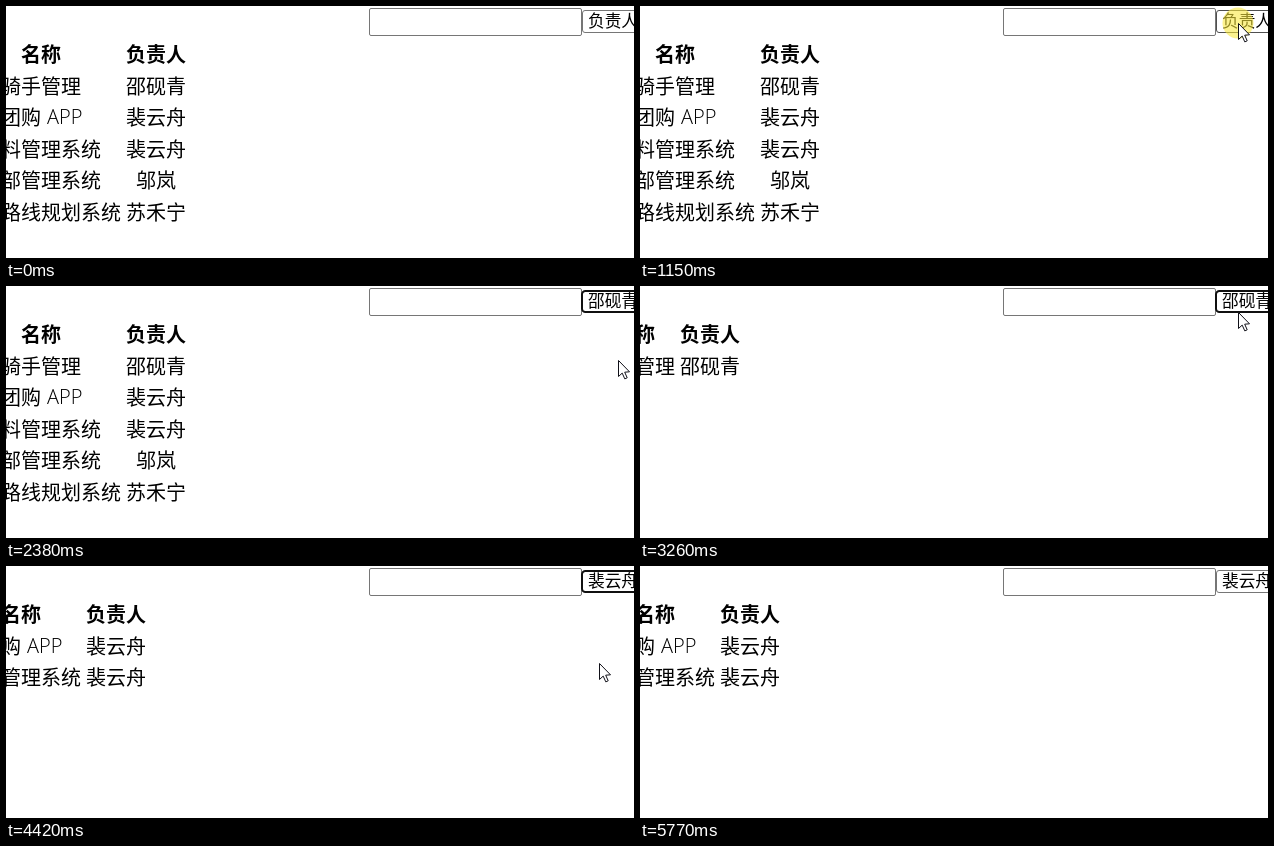
An HTML page with a canvas that plays this animation: 628 px wide and 252 px high, repeating every 5840 ms.

```html
<!DOCTYPE html>
<html lang="zh-CN">
<head>
<meta charset="utf-8">
<title>按负责人筛选</title>
<style>
html, body { margin: 0; width: 100%; height: 100%; overflow: hidden; background: #fff; }
canvas { display: block; width: 628px; height: 252px; }
</style>
</head>
<body>
<canvas id="stage" width="628" height="252"></canvas>
<script>
const ctx = document.getElementById('stage').getContext('2d');
const LOOP = 5840;
const CJK = '"Noto Sans CJK SC", "Noto Sans CJK", sans-serif';

const options = ['负责人', '邵砚青', '裴云舟', '邬岚', '苏禾宁'];
const projects = [
  ['骑手管理', 1],
  ['团购 APP', 2],
  ['物料管理系统', 2],
  ['总部管理系统', 3],
  ['送餐路线规划系统', 4]
];
// Column centres for each filter value
const columns = [[35, 150], [-5, 70], [15, 110]];

const smooth = p => p * p * (3 - 2 * p);
const easeOut = p => p * (1.6 - 0.6 * p);
const easeIn = p => p * (0.6 + 0.4 * p);

// Pointer moves: first step, last step, step count, target, easing
const moves = [
  [200, 740, 9, 596, 50, easeOut],
  [810, 1080, 5, 598, 17, easeOut],
  [1770, 2050, 5, 612, 74, smooth],
  [2840, 2840, 1, 610, 73, smooth],
  [2980, 3260, 5, 598, 26, smooth],
  [3390, 3530, 3, 598, 18, smooth],
  [3600, 3600, 1, 598, 17, smooth],
  [3800, 4160, 6, 593, 97, smooth],
  [4620, 5170, 9, 570, 217, easeIn],
  [5240, 5370, 3, 567, 256, easeIn]
];

const clicks = [[1150, 1290], [2310, 2380], [3600, 3670], [4290, 4420]];
const popups = [[1220, 2380], [3670, 4420]];
const focused = [[2380, 3600], [4420, 5770]];

const during = (t, spans) => spans.some(([a, b]) => t >= a && t < b);
const stage = (t, first, second) => t < first ? 0 : t < second ? 1 : 2;

function pointerAt(t) {
  let x = 562, y = 262;
  for (const [start, end, count, tx, ty, ease] of moves) {
    if (t < start) break;
    const step = count > 1 ? (end - start) / (count - 1) : 1;
    const k = Math.min(count, Math.floor((t - start + 2) / step) + 1);
    const p = ease(k / count);
    x += (tx - x) * p;
    y += (ty - y) * p;
  }
  return { x: Math.round(x), y: Math.round(y) };
}

function text(str, x, y, size, { align = 'left', weight = 350, color = '#000', family = CJK } = {}) {
  ctx.font = `${weight} ${size}px ${family}`;
  ctx.textAlign = align;
  ctx.fillStyle = color;
  ctx.fillText(str, x, y);
}

function strokeBox(x, y, w, h, r, color, width = 1) {
  ctx.beginPath();
  ctx.roundRect(x, y, w, h, r);
  ctx.lineWidth = width;
  ctx.strokeStyle = color;
  ctx.stroke();
}

function drawName(name, cx, y) {
  const [han, latin] = name.split(' ');
  if (!latin) return text(name, cx, y, 20, { align: 'center' });
  text(han, cx - 40, y, 20);
  text(latin, cx + 6, y - 1, 20, { weight: 300, family: '"Open Sans", "Noto Sans", sans-serif' });
}

function drawTable(filter) {
  const [c1, c2] = columns[filter];
  const head = { align: 'center', weight: 700 };
  text('名称', c1, 55.5, 20, head);
  text('负责人', c2, 55.5, 20, head);
  projects
    .filter(p => !filter || p[1] === filter)
    .forEach(([name, owner], i) => {
      const y = Math.round(87.6 + i * 31.5);
      drawName(name, c1, y);
      text(options[owner], c2, y, 20, { align: 'center' });
    });
}

function drawControls(value, focus, hover) {
  strokeBox(363.5, 2.5, 212, 27, 1.5, '#767676');
  if (focus) strokeBox(576, 5, 83, 21, 3.5, '#101010', 2);
  else strokeBox(576.5, 4.5, 83, 22, 2.5, hover ? '#4f4f4f' : '#767676');
  text(options[value], 582, 21.4, 16.67);
}

function drawPopup(active) {
  ctx.save();
  ctx.fillStyle = '#fff';
  ctx.beginPath();
  ctx.roundRect(577.5, 31.5, 82, 122, 8);
  for (const [dy, blur, alpha] of [[32, 72, 0.26], [6, 18, 0.2]]) {
    ctx.shadowColor = `rgba(0,0,0,${alpha})`;
    ctx.shadowBlur = blur;
    ctx.shadowOffsetY = dy;
    ctx.fill();
  }
  ctx.restore();
  strokeBox(577.5, 31.5, 82, 122, 8, '#a8a8a8');

  ctx.fillStyle = '#757575';
  ctx.fillRect(578, 33 + active * 24, 81, 24);
  options.forEach((name, i) =>
    text(name, 583, 51.4 + i * 24, 16.67, { color: i === active ? '#fff' : '#000' }));
}

function drawPointer({ x, y }, pressed) {
  if (pressed) {
    ctx.fillStyle = 'rgba(250,232,60,0.58)';
    ctx.beginPath();
    ctx.arc(x, y, 15.5, 0, Math.PI * 2);
    ctx.fill();
  }
  ctx.save();
  ctx.translate(x + 0.5, y + 0.5);
  ctx.beginPath();
  [[0, 0], [0, 16], [3.7, 12.6], [6.3, 18.4], [8.7, 17.3], [6.2, 11.7], [11, 11.3]]
    .forEach(([px, py]) => ctx.lineTo(px, py));
  ctx.closePath();
  ctx.fillStyle = '#fff';
  ctx.fill();
  ctx.lineWidth = 1;
  ctx.strokeStyle = '#101018';
  ctx.stroke();
  ctx.restore();
}

function draw(t) {
  const pointer = pointerAt(t);
  const value = stage(t, 2380, 4420);
  const open = during(t, popups);
  const hover = pointer.x >= 576 && pointer.y >= 4 && pointer.y < 27;

  ctx.fillStyle = '#fff';
  ctx.fillRect(0, 0, 628, 252);
  drawTable(stage(t, 2780, 4420));
  drawControls(value, during(t, focused), hover);
  if (open) {
    const row = Math.floor((pointer.y - 33) / 24);
    drawPopup(row >= 0 ? Math.min(row, options.length - 1) : value);
  }
  drawPointer(pointer, during(t, clicks));
}

const began = performance.now();
function tick() {
  draw((performance.now() - began) % LOOP);
  requestAnimationFrame(tick);
}
tick();
</script>
</body>
</html>
```
